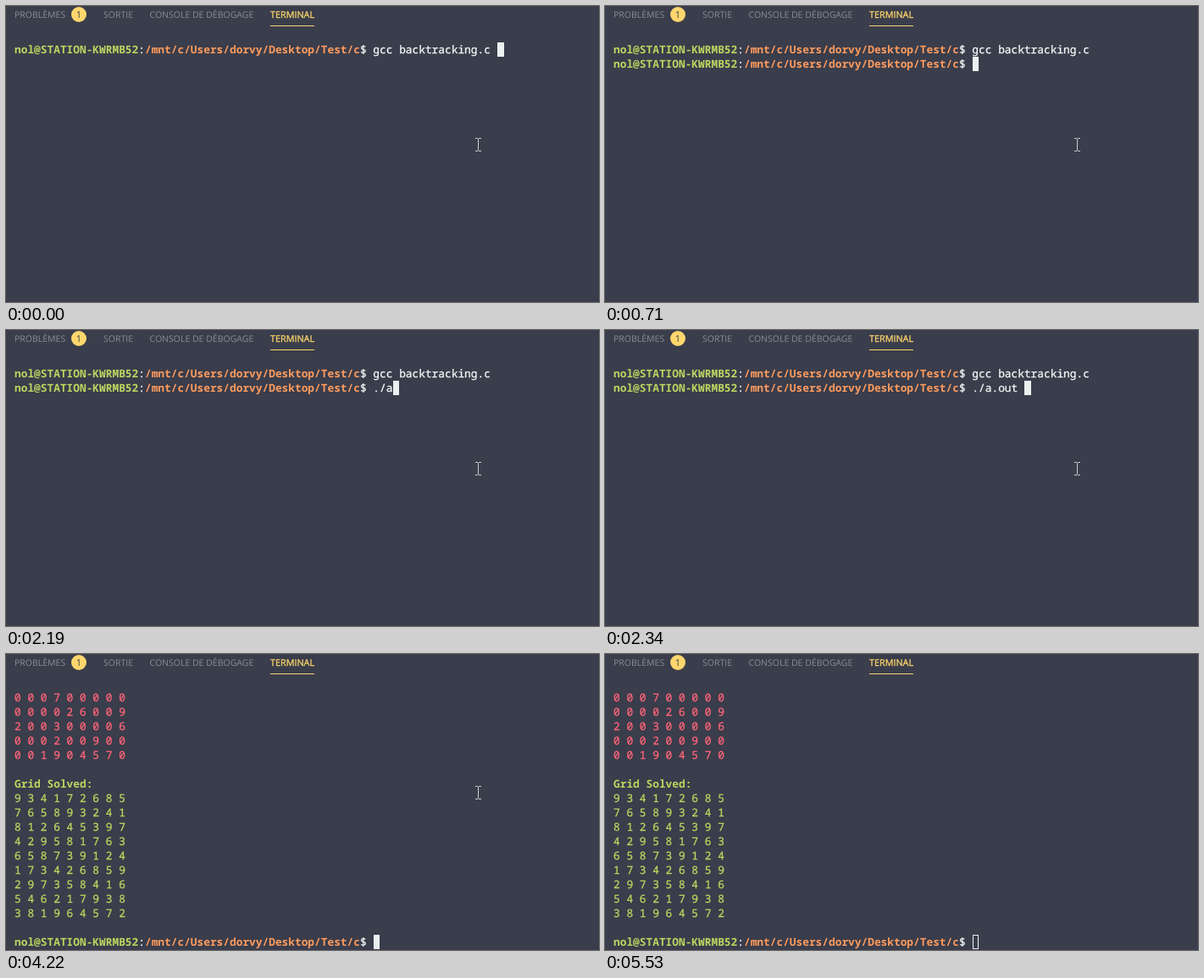
An HTML page that plays this animation: 700 px wide and 350 px high, repeating every 5680 ms.

```html
<!DOCTYPE html>
<html lang="fr">
<head>
<meta charset="utf-8">
<title>Terminal</title>
<style>
  html, body { margin: 0; width: 100%; height: 100%; overflow: hidden; background: #3a3d4b; }
  svg { display: block; width: 700px; height: 350px; }
  text { white-space: pre; text-rendering: geometricPrecision; stroke-width: 0.3px; }
  .tabs text { font: 10.5px "Open Sans", "Noto Sans", sans-serif; fill: #888d94; }
  .tabs .active { font-size: 10.8px; fill: #ffd76d; stroke: #ffd76d; }
  .tabs .count { font-size: 11px; fill: #3a3d4b; text-anchor: middle; }
  #screen text { font: 12.833px "Noto Sans Mono", "DejaVu Sans Mono", monospace; }
  /* A hairline outline gives the regular weight its sturdier look. */
  #screen .white { fill: #f4f9f8; stroke: #f4f9f8; }
  #screen .green { fill: #bad761; stroke: #bad761; }
  #screen .orange { fill: #ff9b5e; }
  #screen .red { fill: #ff657a; stroke: #ff657a; }
  #screen .bold { font-weight: 700; stroke: none; }
</style>
</head>
<body>
<svg viewBox="0 0 700 350">
  <rect width="700" height="350" fill="#3a3d4b"/>
  <g class="tabs">
    <text x="10" y="14">PROBLÈMES</text>
    <circle cx="86" cy="10" r="9" fill="#ffd76d"/>
    <text class="count" x="86" y="14">1</text>
    <text x="115" y="14">SORTIE</text>
    <text x="169.5" y="14">CONSOLE DE DÉBOGAGE</text>
    <text class="active" x="312" y="14">TERMINAL</text>
    <rect x="312" y="23" width="52" height="1" fill="#ffd76d"/>
  </g>
  <g id="screen"></g>
  <rect id="caret"/>
  <path id="mouse" d="M554 156.5h3m1 0h3M557.5 157v14M554 171.5h3m1 0h3" fill="none" stroke="#c9cfd0"/>
</svg>
<script>
const LOOP = 5680, LEFT = 10, TOP = 43, CELL = 7.7, ROW = 17, ROWS = 18;
const screen = document.getElementById("screen");
const caret = document.getElementById("caret");
const mouse = document.getElementById("mouse");

const base = ["900100005", "005090201", "800040000", "000080000", "000700000",
              "000026009", "200300006", "000200900", "001904570"];
const solved = ["934172685", "765893241", "812645397", "429581763", "658739124",
                "173426859", "297358416", "546217938", "381964572"];

// A line is a list of [text, class] spans.
const prompt = command => [
  ["nol@STATION-KWRMB52", "bold green"], [":", "white"],
  ["/mnt/c/Users/dorvy/Desktop/Test/c", "bold orange"], ["$ " + command, "white"]
];
const grid = (title, rows, color) =>
  [[[title, "bold " + color]], ...rows.map(r => [[r.split("").join(" "), color]])];

const typing = [[2340, "./a.out "], [2190, "./a"], [2020, "./"], [1950, "."], [0, ""]];

function linesAt(t) {
  const lines = [prompt("gcc backtracking.c ")];
  if (t < 630) return lines;
  if (t < 710) return [...lines, []];
  lines.push(prompt(typing.find(([start]) => t >= start)[1]));
  if (t < 3270) return lines;
  lines.push([], ...grid("Base Grid:", base, "red"), []);
  const result = grid("Grid Solved:", solved, "green");
  if (t < 4220) return [...lines, result[0], []];
  return [...lines, ...result, [], prompt("")];
}

function setAttrs(node, attrs) {
  for (const name in attrs) node.setAttribute(name, attrs[name]);
}

function drawCaret(line, row, hollow) {
  const column = line.reduce((n, [text]) => n + text.length, 0);
  const x = Math.round(LEFT + column * CELL);
  const width = Math.round(LEFT + (column + 1) * CELL) - x;
  const inset = hollow ? 0.5 : 0;
  setAttrs(caret, {
    x: x + inset, y: TOP + row * ROW + inset,
    width: width - 2 * inset, height: ROW - 2 * inset,
    fill: hollow ? "none" : "#eaf2f1", stroke: hollow ? "#eaf2f1" : "none"
  });
}

function drawMouse(t) {
  const step = [5070, 5145, 5220].filter(start => t >= start).length;
  const k = (step / 3) ** 2;
  setAttrs(mouse, {
    transform: `translate(${Math.round(53 * k)} ${Math.round(169 * k)})`,
    visibility: t < 5300 ? "visible" : "hidden"
  });
}

let shown = "";
function render(t) {
  const lines = linesAt(t);
  const view = lines.slice(-ROWS);
  const markup = view.map((line, i) =>
    `<text x="${LEFT}" y="${TOP + 13 + i * ROW}">` +
    line.map(([text, cls]) => `<tspan class="${cls}">${text}</tspan>`).join("") +
    "</text>").join("");
  if (markup !== shown) screen.innerHTML = shown = markup;
  drawCaret(view[view.length - 1], view.length - 1, t >= 5530);
  drawMouse(t);
}

const start = performance.now();
function tick() {
  render((performance.now() - start) % LOOP);
  requestAnimationFrame(tick);
}
tick();
</script>
</body>
</html>
```
